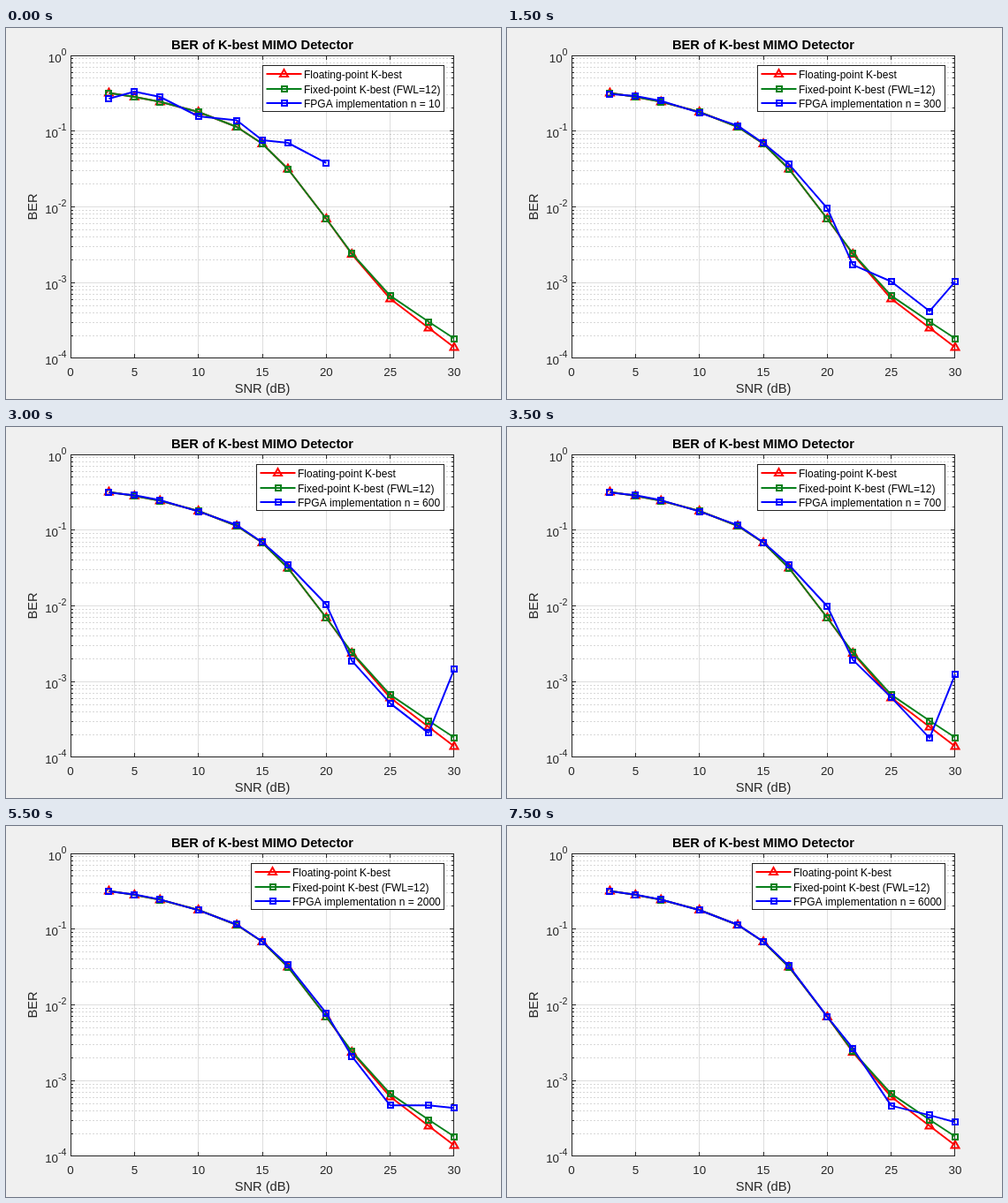
Write an HTML page with a canvas that moves like this. It is 560 px wide and 420 px high and loops after 8000 ms.

```html
<!DOCTYPE html>
<html lang="en">
<head>
<meta charset="utf-8">
<title>BER chart</title>
<style>
html, body { margin: 0; width: 100%; height: 100%; overflow: hidden; background: #f0f0f0; }
canvas { display: block; }
</style>
</head>
<body>
<canvas id="c" width="560" height="420"></canvas>
<script>
const ctx = document.getElementById('c').getContext('2d');
const FONT = '"Liberation Sans", Arial, sans-serif';
const INK = '#262626', RED = '#ff0000', GREEN = '#08801c', BLUE = '#0000ff';
const L = 73, R = 507, T = 31, B = 374;
const DECADE = (B - T) / 4;
const STEP = 500, STEPS = 16;

const toX = snr => L + snr / 30 * (R - L);
const toY = ber => T - Math.log10(ber) * DECADE;
const snap = v => Math.floor(v) + 0.5;
const range = (n, f) => Array.from({ length: n }, (_, i) => f(i));

const SNR = [3, 5, 7, 10, 13, 15, 17, 20, 22, 25, 28, 30];
const xs = SNR.map(toX);

// True curve in stage heights; fixed point drifts away above 20 dB
const floating = [73.5, 78, 83.5, 95, 112, 131, 159.5, 216, 256, 306.5, 339.5, 361.5];
const fixed = floating.map((y, i) => y - 10 * (Math.max(0, SNR[i] - 20) / 10) ** 1.6);

// Low SNR: offset of the first short run, shrinking with the root of n
const firstOffset = [6.5, -6, -5.5, 5, -7.5, -4, -29.5];

// High SNR: errors are rare, so they are counted as [samples, errors]
const errors = {
  20: [[10, 0.38], [100, 0.63], [600, 6.25], [2000, 15.5], [6000, 41.8]],
  22: [[200, 0.34], [400, 0.69], [900, 1.8], [2000, 4.2], [6000, 16]],
  25: [[200, 0.31], [600, 0.31], [900, 0.68], [2000, 0.94], [6000, 2.8]],
  28: [[300, 0.126], [900, 0.126], [1000, 0.42], [2000, 0.94], [6000, 2.1]],
  30: [[200, 0.31], [400, 0.31], [600, 0.87], [3000, 0.87], [6000, 1.7]]
};

function lerpKeys(keys, n) {
  if (n < keys[0][0]) return null;
  const i = Math.max(1, keys.findIndex(k => k[0] >= n));
  const [n0, e0] = keys[i - 1], [n1, e1] = keys[i];
  return e0 + (e1 - e0) * (n - n0) / (n1 - n0);
}

function measured(n, i) {
  if (i < firstOffset.length) return floating[i] + firstOffset[i] * Math.sqrt(10 / n);
  const e = lerpKeys(errors[SNR[i]], n);
  return e === null ? null : toY(e / n);
}

// 10, then hundreds up to 1000, then thousands
function sampleCount(step) {
  if (step === 0) return 10;
  return step <= 10 ? step * 100 : (step - 9) * 1000;
}

function line(x1, y1, x2, y2) {
  ctx.beginPath();
  ctx.moveTo(x1, y1);
  ctx.lineTo(x2, y2);
  ctx.stroke();
}

function text(s, x, y, size, align = 'left', color = INK, weight = '') {
  ctx.font = `${weight} ${size}px ${FONT}`;
  ctx.textAlign = align;
  ctx.fillStyle = color;
  ctx.fillText(s, x, y);
}

function square(x, y) {
  ctx.strokeRect(Math.round(x) - 3, Math.round(y) - 3, 6, 6);
}

function triangle(x, y) {
  ctx.beginPath();
  ctx.moveTo(x, y - 5);
  ctx.lineTo(x + 4.5, y + 3);
  ctx.lineTo(x - 4.5, y + 3);
  ctx.closePath();
  ctx.stroke();
}

function series(ys, color, marker) {
  ctx.strokeStyle = color;
  ctx.lineWidth = 2;
  ctx.lineJoin = 'round';
  ctx.beginPath();
  let pen = false;
  ys.forEach((y, i) => {
    if (y !== null) ctx[pen ? 'lineTo' : 'moveTo'](xs[i], y);
    pen = y !== null;
  });
  ctx.stroke();
  ctx.lineJoin = 'miter';
  ys.forEach((y, i) => { if (y !== null) marker(xs[i], y); });
}

function ticksY(y, len) {
  line(L, y, L + len, y);
  line(R - len, y, R, y);
}

function axes() {
  ctx.fillStyle = '#f0f0f0';
  ctx.fillRect(0, 0, 560, 420);
  ctx.fillStyle = '#fff';
  ctx.fillRect(L, T, R - L, B - T);
  ctx.lineWidth = 1;

  const minor = range(32, i => snap(toY((2 + i % 8) * 10 ** -(1 + Math.floor(i / 8)))));
  const major = range(5, d => Math.min(snap(T + d * DECADE), B - 0.5));
  const cols = range(7, i => Math.min(snap(toX(i * 5)), R - 0.5));

  ctx.strokeStyle = 'rgba(26,26,26,0.17)';
  ctx.setLineDash([2, 2]);
  minor.forEach(y => line(L + 1, y, R - 1, y));
  ctx.setLineDash([]);
  ctx.strokeStyle = 'rgba(38,38,38,0.15)';
  major.forEach(y => line(L, y, R, y));
  cols.forEach(x => line(x, T, x, B));

  ctx.strokeStyle = INK;
  ctx.strokeRect(L + 0.5, T + 0.5, R - L - 1, B - T - 1);
  minor.forEach(y => ticksY(y, 3));
  major.forEach((y, d) => {
    ticksY(y, 5);
    const exp = d ? '-' + d : '0';
    text(exp, 68.5, y - 1, 10.67, 'right');
    const w = ctx.measureText(exp).width;
    text('10', 68.5 - w, y + 7.5, 13.33, 'right');
  });
  cols.forEach((x, i) => {
    line(x, T, x, T + 5);
    line(x, B - 5, x, B);
    text(String(i * 5), toX(i * 5), 393.5, 13.33, 'center');
  });

  text('BER of K-best MIMO Detector', 290, 24, 14.67, 'center', '#000', 'bold');
  text('SNR (dB)', 290, 413, 14.67, 'center');
  ctx.save();
  ctx.translate(35, 202.5);
  ctx.rotate(-Math.PI / 2);
  text('BER', 0, 0, 14.67, 'center');
  ctx.restore();
}

function legend(n) {
  const left = snap(303.7 - 6.67 * String(n).length);
  ctx.fillStyle = '#fff';
  ctx.fillRect(left, 42.5, 495.5 - left, 52);
  ctx.strokeStyle = INK;
  ctx.lineWidth = 1;
  ctx.strokeRect(left, 42.5, 495.5 - left, 52);
  const rows = [
    ['Floating-point K-best', RED, triangle],
    ['Fixed-point K-best (FWL=12)', GREEN, square],
    ['FPGA implementation n = ' + n, BLUE, square]
  ];
  rows.forEach(([label, color, marker], i) => {
    const y = Math.round(52 + i * 16.7);
    ctx.strokeStyle = color;
    ctx.lineWidth = 2;
    line(left + 4, y, left + 44, y);
    marker(left + 24, y);
    text(label, left + 46.5, y + 5, 12, 'left', '#000');
  });
}

let shown = -1;
function draw(now) {
  const step = Math.floor(Math.max(0, now) / STEP) % STEPS;
  if (step !== shown) {
    shown = step;
    const n = sampleCount(step);
    axes();
    series(floating, RED, triangle);
    series(fixed, GREEN, square);
    series(SNR.map((_, i) => measured(n, i)), BLUE, square);
    legend(n);
  }
  requestAnimationFrame(t => draw(t - start));
}
const start = performance.now();
draw(0);
</script>
</body>
</html>
```
